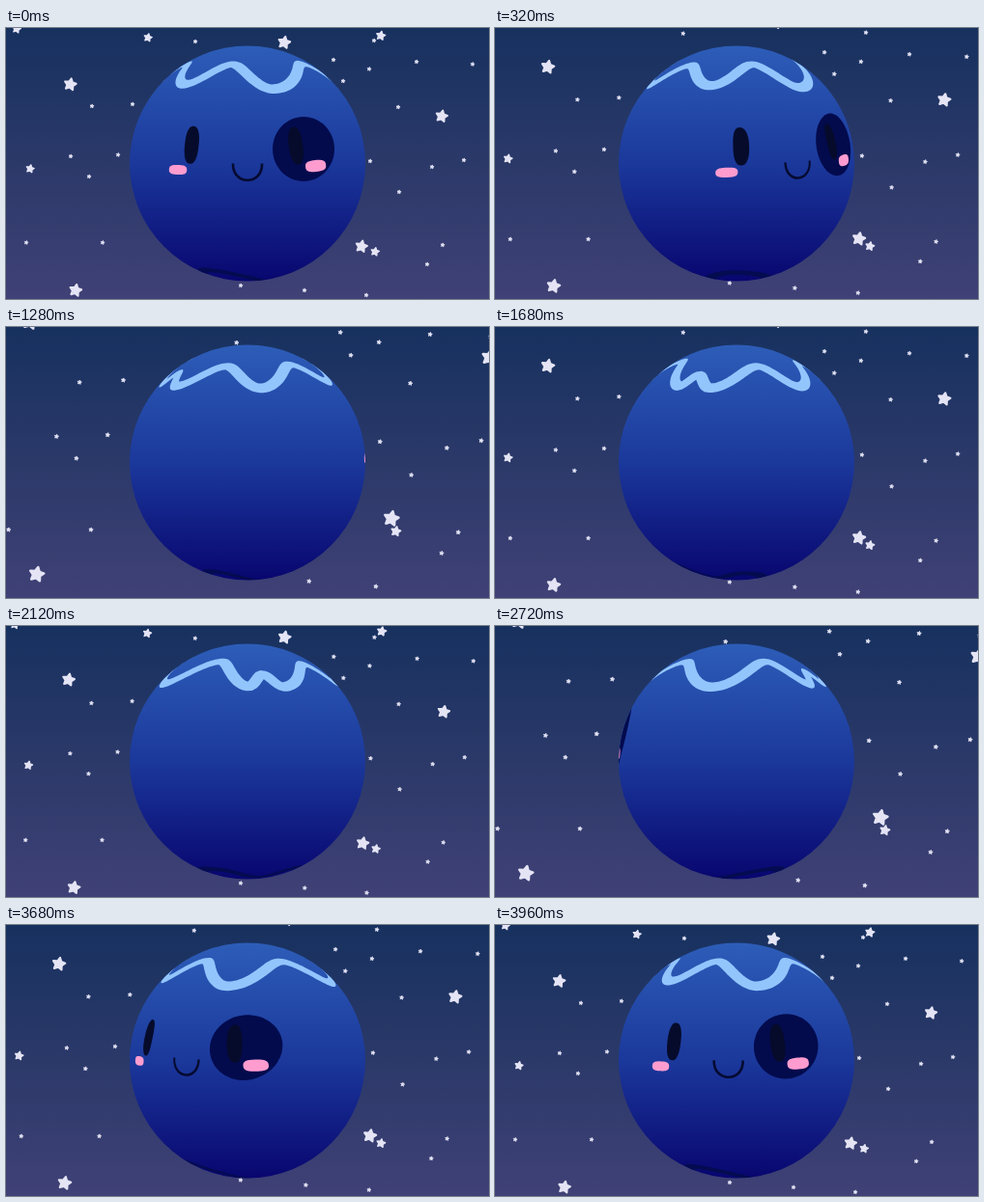
Animation of 500x281 px, one loop 4000 ms. Source, as an HTML page with a canvas:

```html
<!DOCTYPE html>
<html lang="en">
<head>
<meta charset="utf-8">
<title>Blue planet</title>
<style>
  html, body { margin: 0; width: 100%; height: 100%; overflow: hidden; background: #2b386a; }
  canvas { display: block; width: 500px; height: 281px; }
</style>
</head>
<body>
<canvas id="stage"></canvas>
<script>
const W = 500, H = 281, LOOP = 4000, STEP = 40;
const CX = 250, CY = 140.5, R = 122;
const EYE = 10, FOCAL = Math.sqrt(EYE * EYE - 1); // camera distance in planet radii
const RAD = Math.PI / 180, TILT = 7.3 * RAD;
const SIN_T = Math.sin(TILT), COS_T = Math.cos(TILT);

const canvas = document.getElementById('stage');
const ctx = canvas.getContext('2d');
const dpr = window.devicePixelRatio || 1;
canvas.width = Math.round(W * dpr);
canvas.height = Math.round(H * dpr);

function verticalGradient(y0, y1, ...colors) {
  const g = ctx.createLinearGradient(0, y0, 0, y1);
  colors.forEach((c, i) => g.addColorStop(i / (colors.length - 1), c));
  return g;
}
const sky = verticalGradient(0, H, '#17315f', '#2b3969', '#404176');
const body = verticalGradient(CY - R, CY + R, '#2d5db8', '#1b389b', '#08066f');

// --- Sphere geometry ---
function project([x, y, z], spin) {
  const c = Math.cos(spin), s = Math.sin(spin);
  const px = x * c + z * s, pz = z * c - x * s;
  const vy = y * COS_T - pz * SIN_T, vz = pz * COS_T + y * SIN_T;
  const visible = vz > 1 / EYE;
  // Hidden points slide onto the outline so shapes close along the limb.
  const k = R * (visible ? FOCAL / (EYE - vz) : 1 / Math.hypot(px, vy));
  return { x: CX + px * k, y: CY - vy * k, visible };
}

function unproject([sx, sy]) {
  const u = (sx - CX) / R, w = (CY - sy) / R;
  const d = u * u + w * w, q = d / (FOCAL * FOCAL);
  const vz = (EYE * q + Math.sqrt(Math.max(0, 1 - d))) / (1 + q);
  const k = (EYE - vz) / FOCAL, vy = w * k;
  return [u * k, vy * COS_T + vz * SIN_T, vz * COS_T - vy * SIN_T];
}

const fromLonLat = (lon, lat) => {
  const a = lon * RAD, b = lat * RAD;
  return [Math.cos(b) * Math.sin(a), Math.sin(b), Math.cos(b) * Math.cos(a)];
};

function fillOnSphere(points, spin, color) {
  const flat = points.map(p => project(p, spin));
  if (!flat.some(p => p.visible)) return;
  ctx.beginPath();
  flat.forEach(p => ctx.lineTo(p.x, p.y));
  ctx.closePath();
  ctx.fillStyle = color;
  ctx.fill();
}

// --- Face, laid out as seen from the front ---
function blob(cx, cy, rx, ry, tilt = 0, power = 2) {
  const c = Math.cos(tilt * RAD), s = Math.sin(tilt * RAD);
  const bend = v => Math.sign(v) * Math.abs(v) ** (2 / power);
  return Array.from({ length: 64 }, (_, i) => {
    const a = i / 32 * Math.PI;
    const x = rx * bend(Math.cos(a)), y = ry * bend(Math.sin(a));
    return unproject([cx + x * c - y * s, cy + x * s + y * c]);
  });
}

function smile(cx, top, half, depth, width) {
  const edge = side => Array.from({ length: 33 }, (_, i) => {
    const a = i / 32 * Math.PI;
    const dx = -Math.cos(a), dy = Math.sin(a) ** 0.85;
    return unproject([cx + dx * (half + side), top + dy * (depth + side)]);
  });
  return [...edge(width / 2), ...edge(-width / 2).reverse()];
}

const face = [
  [blob(308, 125.5, 32, 33.5), '#030b4d'],
  [blob(192.3, 121.3, 7.2, 19.6, 6, 2.4), '#060b2b'],
  [blob(300, 122, 7.2, 19.6, -8, 2.4), '#060b2b'],
  [blob(178, 147, 9.2, 5, 2, 2.8), '#ff9ccf'],
  [blob(320.6, 143, 10.6, 6, -6, 2.8), '#ff9ccf'],
  [smile(250, 140.5, 15, 17.3, 2.6), '#050a30']
];

// --- Wavy bands: longitude and latitude of each crest and trough ---
const northBand = [
  [-168, 43], [-133, 57.5], [-107, 43], [-74, 58.5], [-46, 45], [-14, 60],
  [16, 43], [61, 59.5], [99, 43], [144, 60.5], [170, 43.5], [180, 51]
];
const southBand = [
  [-145, -58], [-90, -77], [-30, -55.5], [55, -81], [145, -56], [183, -67]
];

function latitude(band, lon) {
  const start = band[0][0];
  const l = start + (((lon - start) % 360) + 360) % 360;
  const keys = [...band, [start + 360, band[0][1]]];
  const i = keys.findIndex(k => k[0] > l);
  const [l0, a] = keys[i - 1], [l1, b] = keys[i];
  return a + (b - a) * (1 - Math.cos((l - l0) / (l1 - l0) * Math.PI)) / 2;
}

function drawBand(band, halfWidth, spin, color) {
  const upper = [], lower = [];
  for (let rel = -105; rel <= 105; rel += 1.5) {
    const lon = rel - spin / RAD, lat = latitude(band, lon);
    const squeeze = Math.cos(lat * RAD);
    const rise = latitude(band, lon + 0.5) - latitude(band, lon - 0.5);
    const len = Math.hypot(squeeze, rise);
    const dLon = -rise / len * halfWidth / squeeze, dLat = squeeze / len * halfWidth;
    upper.push(fromLonLat(lon + dLon, lat + dLat));
    lower.push(fromLonLat(lon - dLon, lat - dLat));
  }
  fillOnSphere([...upper, ...lower.reverse()], spin, color);
}

// --- Stars: x, y, then size, zoom and focus height per layer ---
const tiny = [
  [196, 14], [339, 33], [349, 55], [376, 42.5], [381, 13], [425, 35], [483, 37.5],
  [406, 82], [89, 81], [131, 79], [67, 133], [116, 131.5], [86, 154], [21, 222.5],
  [100, 222.5], [377, 138], [441, 144], [474, 137], [407, 170], [452, 225],
  [436, 245], [243, 267], [309, 272], [373, 277], [239.5, 43]
].map(([x, y]) => [x, y, 2.5, 0.098, 376]);
const stars = [
  ...tiny,
  [147, 10, 4.9, 0.2, 355], [25, 146, 4.9, 0.22, 350], [11, 1, 5, 0.2, 355],
  [382, 232, 5, 0.2, 355], [388, 8, 5.4, 0.2, 355],
  [66.5, 58.5, 7.2, 0.276, 341], [72, 272, 7.2, 0.276, 341], [288, 15, 7.2, 0.28, 340],
  [451, 91.5, 7, 0.3, 335], [368, 226.5, 7, 0.32, 333]
];

function drawStar(x, y, r) {
  ctx.beginPath();
  for (let i = 0; i < 10; i++) {
    const a = 0.2 + i * Math.PI / 5, d = (i % 2 ? 0.44 : 0.86) * r;
    ctx.lineTo(x + d * Math.sin(a), y - d * Math.cos(a));
  }
  ctx.closePath();
  ctx.lineWidth = r * 0.28;
  ctx.fill();
  ctx.stroke();
}

function render(time) {
  const t = Math.floor((time % LOOP) / STEP) * STEP;
  const spin = t / LOOP * 2 * Math.PI;
  const zoom = (1 - Math.cos(2 * spin)) / 2;

  ctx.setTransform(canvas.width / W, 0, 0, canvas.height / H, 0, 0);
  ctx.fillStyle = sky;
  ctx.fillRect(0, 0, W, H);

  ctx.fillStyle = ctx.strokeStyle = '#e4e4f5';
  ctx.lineJoin = 'round';
  for (const [x, y, r, depth, focus] of stars) {
    const k = depth * zoom;
    drawStar(x + (x - CX) * k, y + (y - focus) * k, r * (1 + k));
  }

  ctx.save();
  ctx.beginPath();
  ctx.arc(CX, CY, R, 0, 2 * Math.PI);
  ctx.fillStyle = body;
  ctx.fill();
  ctx.clip();
  drawBand(southBand, 2.6, spin, '#040b50');
  drawBand(northBand, 2.7, spin, '#93c5fd');
  for (const [shape, color] of face) fillOnSphere(shape, spin, color);
  ctx.restore();
}

function tick() {
  render(performance.now());
  requestAnimationFrame(tick);
}
tick();
</script>
</body>
</html>
```
